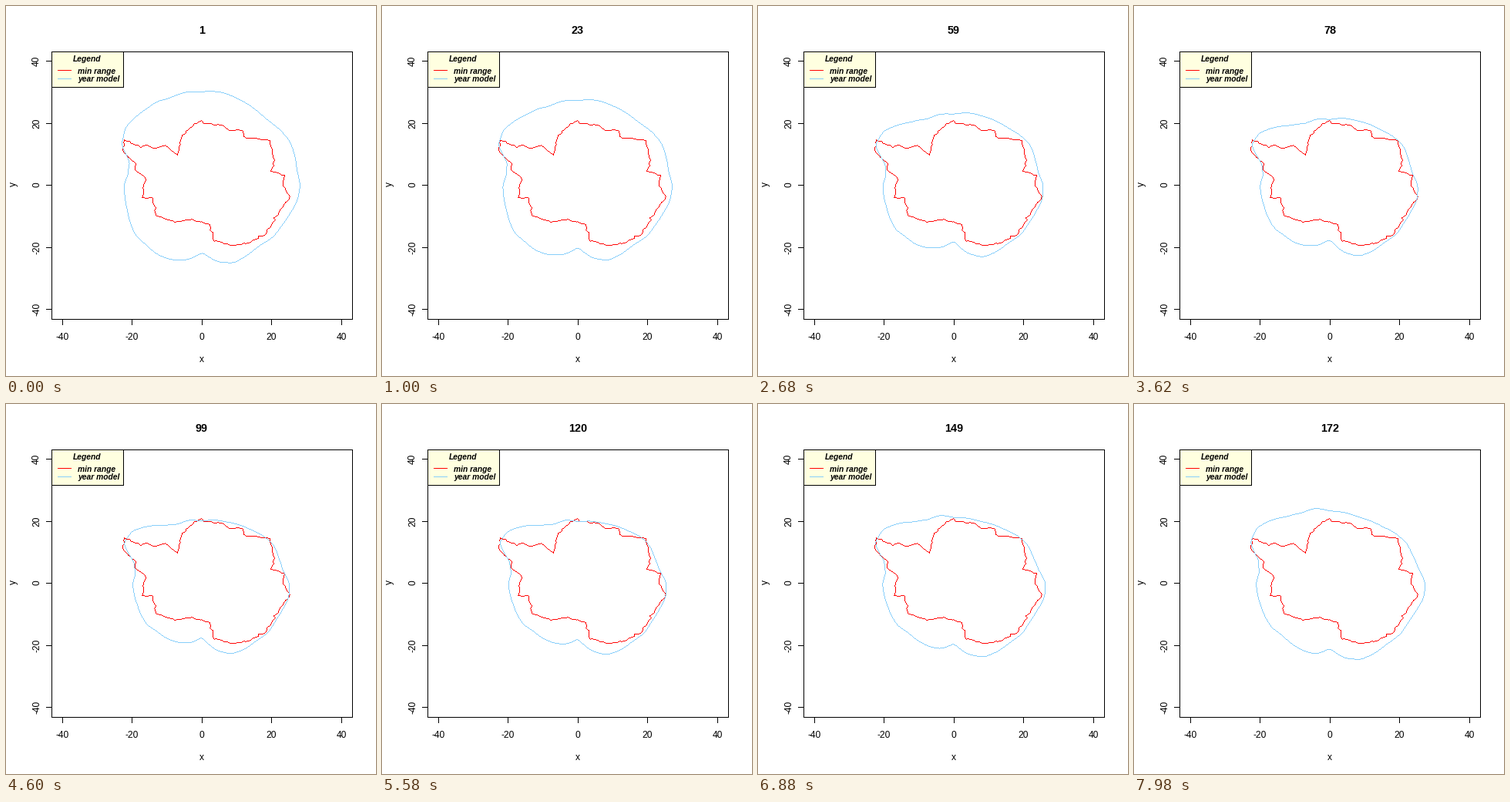
A matplotlib script that plays this animation: 480x480 px, repeating every 8000 ms.

```python
import numpy as np
import matplotlib.pyplot as plt
from matplotlib.animation import FuncAnimation
from matplotlib.colors import to_rgba
from matplotlib.patches import Rectangle

SIZE, DPI = 480, 100
PT = 72 / DPI                      # points per pixel
CENTER = np.array([254.0, 232.4])  # pixel of the data origin
SCALE = np.array([4.522, -4.022])  # pixels per data unit
YEAR = 365
RED, BLUE = "#ff0000", "#87cefa"

plt.rcParams["font.family"] = "Liberation Sans"

# Corners of the smallest range, in data units
CORNERS = [
    (-22.3, 14.8), (-17.7, 12.3), (-16.4, 13), (-13.9, 12), (-10.6, 13),
    (-7.1, 9.8), (-5.7, 16.3), (-3.3, 18.7), (-0.1, 21), (0.5, 20),
    (4.9, 19.6), (8.6, 17.8), (11.7, 17.6), (12.4, 15.5), (19.5, 14.5),
    (20.6, 7.6), (19.7, 4.6), (23.7, 3.3), (23.2, -0.2), (25.2, -3.6),
    (22.1, -8.4), (18.1, -15.8), (13.3, -18.5), (9.5, -19.3), (3.3, -18),
    (2.2, -12.6), (-2.9, -10.9), (-8, -11.8), (-13.3, -9.8), (-14.3, -3.9),
    (-17.2, -3.9), (-16.4, 2.6), (-19.2, 5.1), (-19, 6.8), (-22.8, 11.3),
]

# Model radius in spring, every 10 degrees
SPRING = [
    25.0, 23.5, 23.4, 23.9, 23.5, 22.4, 21.8, 21.1, 20.8, 20.1, 20.8, 20.3,
    21.6, 24.1, 26.2, 26.0, 20.8, 19.3, 19.9, 19.8, 19.8, 20.2, 20.6, 20.1,
    20.4, 20.2, 19.4, 17.3, 21.6, 24.2, 24.4, 24.1, 24.6, 24.2, 24.5, 25.2,
]
KEY_DAYS = [1, 99, 172]            # winter, spring, summer

degrees = np.arange(360)
theta = np.radians(degrees)
rays = np.column_stack([np.cos(theta), np.sin(theta)])


def bump(at, width, height):
    gap = (degrees - at + 180) % 360 - 180
    return height * np.exp(-0.5 * (gap / width) ** 2)


def smooth(r, half):
    return sum(np.roll(r, k) for k in range(-half, half + 1)) / (2 * half + 1)


def season(day):
    phase = 2 * np.pi * np.asarray(day) / YEAR
    return np.stack([np.ones_like(phase), np.cos(phase), np.sin(phase)], axis=-1)


spring = smooth(np.interp(degrees, np.arange(0, 360, 10), SPRING, period=360), 2)
winter = (spring + 2.2 + bump(89, 30, 7.9) + bump(116, 7, 1.4)
          + bump(245, 28, 3.1) + bump(20, 15, 2)
          + bump(150, 10, -2.4) + bump(305, 15, -1.2))
summer = (spring + 1.3 + bump(105, 20, 2.6) + bump(265, 15, 2.4)
          + bump(5, 15, 1) + bump(150, 8, -1))
coeffs = np.linalg.solve(season(KEY_DAYS), [winter, spring, summer])


def rough(corners, step=0.8, amount=0.17):
    """Closed outline with small seeded jogs between its corners."""
    rng = np.random.default_rng(4)
    out = []
    for a, b in zip(corners, np.roll(corners, -1, axis=0)):
        n = max(1, round(np.hypot(*(b - a)) / step))
        part = a + (b - a) * np.arange(n)[:, None] / n
        part[1:] += rng.normal(0, amount, part[1:].shape)
        out.append(part)
    return np.vstack(out)


def trace(canvas, points, color):
    """Hard-edged closed line, one pixel wide."""
    xy = CENTER + SCALE * np.vstack([points, points[:1]])
    length = np.abs(np.diff(xy, axis=0)).max(axis=1)
    at = np.concatenate([[0], np.cumsum(length)])
    steps = np.arange(0, at[-1])
    col, row = (np.rint(np.interp(steps, at, v)).astype(int) for v in xy.T)
    canvas[row, col] = np.array(to_rgba(color)) * 255


fig = plt.figure(figsize=(SIZE / DPI, SIZE / DPI), dpi=DPI, facecolor="white")
ax = fig.add_axes([0, 0, 1, 1])
ax.set_xlim(0, SIZE)
ax.set_ylim(SIZE, 0)
ax.axis("off")


def line(xs, ys, color="black"):
    ax.plot(xs, ys, color=color, lw=PT, antialiased=False, zorder=6,
            solid_capstyle="butt")


def label(x, y, text, size=12, **kw):
    kw.setdefault("ha", "center")
    return ax.text(x, y, text, fontsize=size * PT, va="baseline",
                   rotation_mode="anchor", zorder=6, **kw)


def box(x0, y0, x1, y1, fill):
    ax.add_patch(Rectangle((x0, y0), x1 - x0, y1 - y0, fc=fill, ec="black",
                           lw=PT, antialiased=False, zorder=5))


box(59, 59, 449, 406, "none")
for value in range(-40, 41, 20):
    x, y = np.floor([254.4 + 4.522 * value, 232.8 - 4.022 * value])
    line([x, x], [406, 413])
    line([52, 59], [y, y])
    label(x, 433, str(value))
    label(43, y, str(value), rotation=90)
label(254, 462, "x")
label(12.5, 231.5, "y", rotation=90)
title = label(254, 36, "1", 14.4, weight="bold")

# Legend
box(59, 59, 152, 105, "#ffffe0")
slanted = dict(size=10.2, weight="bold", style="italic")
label(105.5, 71.5, "Legend", **slanted)
for y, color, text in ((83, RED, "min range"), (94, BLUE, "year model")):
    line([67, 84], [y, y], color)
    label(93, y + 4.5, text, ha="left", **slanted)

base = np.zeros((SIZE, SIZE, 4), np.uint8)
trace(base, rough(np.array(CORNERS)), RED)
curves = fig.figimage(base, origin="upper", zorder=-1)

# Days last 20, 100 and 20 ms in turn, on 20 ms ticks
TICKS = (1, 2, 2, 2, 2, 2, 3)


def update(i):
    day = 3 * (i // len(TICKS)) + TICKS[i % len(TICKS)]
    canvas = base.copy()
    trace(canvas, rays * (season(day) @ coeffs)[:, None], BLUE)
    curves.set_data(canvas)
    title.set_text(str(day))
    return curves, title


anim = FuncAnimation(fig, update, frames=400, interval=20, repeat=True,
                     repeat_delay=0, blit=False)
plt.show()
```
